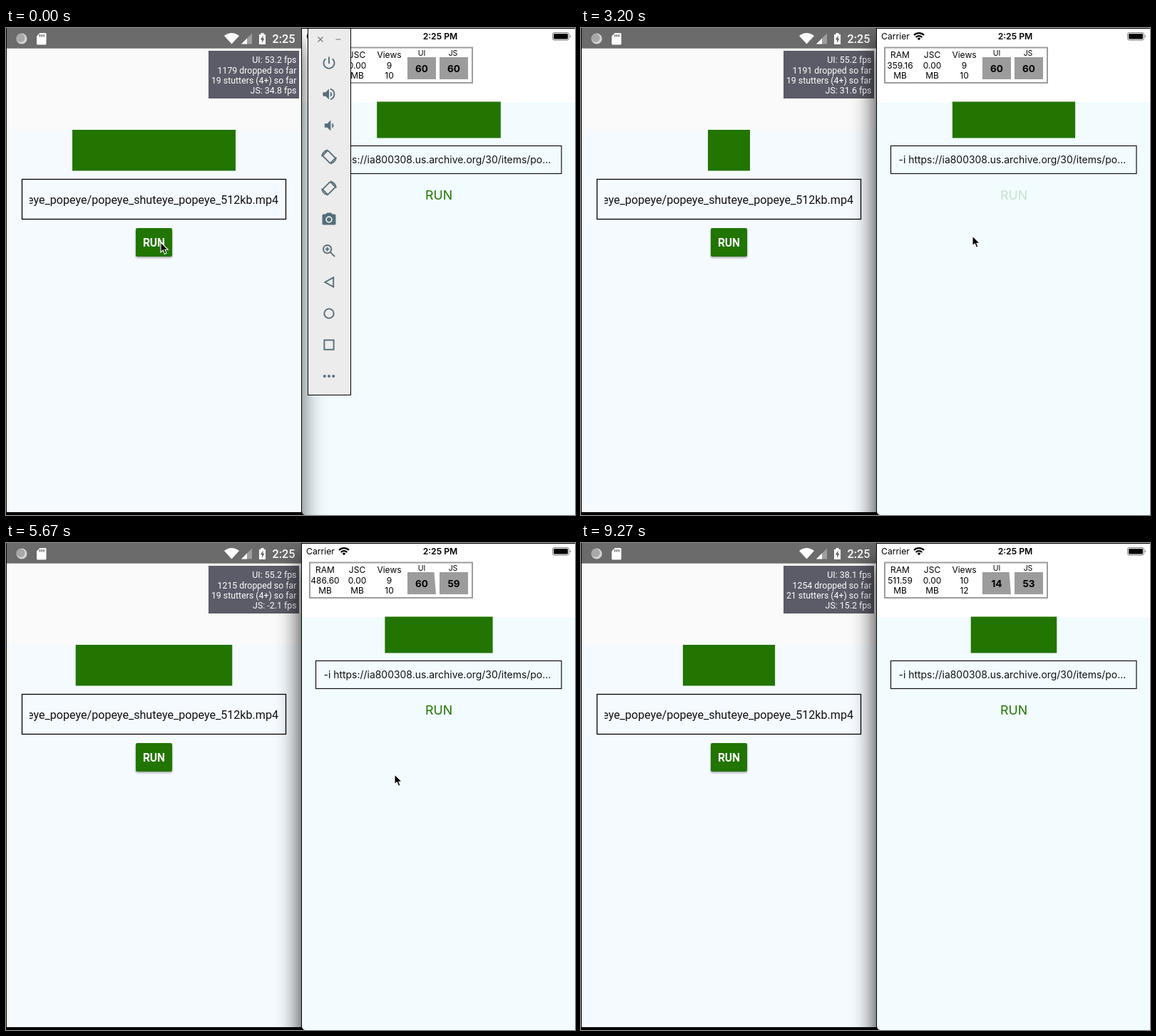
These frames come from a looping animation (798x684 px, 9.34 s). An HTML page:

```html
<!DOCTYPE html>
<html lang="en">
<head>
<meta charset="utf-8">
<title>Two phones</title>
<style>
  html, body { margin: 0; width: 100%; height: 100%; overflow: hidden; background: #000; }
  svg { display: block; width: 798px; height: 684px; }
  text { white-space: pre; }
  #android text { font-family: Roboto, sans-serif; }
  #ios text { font-family: Inter, sans-serif; }
  .mid { text-anchor: middle; }
  .end { text-anchor: end; }
  .stats { font-size: 12.35px; fill: #fff; }
  .perf { font-size: 12px; }
  .label { font-size: 10.5px; }
  .rate { font-size: 13.5px; font-weight: 700; }
  .line { fill: none; stroke: #546e7a; stroke-width: 2; }
</style>
</head>
<body>
<svg viewBox="0 0 798 684">
  <defs>
    <filter id="blur" x="-30%" y="-30%" width="160%" height="160%"><feGaussianBlur stdDeviation="17.5"/></filter>
    <filter id="lift" x="-20%" y="-20%" width="140%" height="150%"><feGaussianBlur stdDeviation="1.5"/></filter>
    <clipPath id="field"><rect x="33" y="214" width="352" height="53"/></clipPath>
  </defs>

  <g id="android">
    <rect x="-100" y="22" width="514" height="760" opacity=".68" filter="url(#blur)"/>
    <rect width="415" height="684"/>
    <rect x="1" width="413" height="28.5" fill="#6b6b6b"/>
    <rect x="1" y="28.5" width="413" height="115" fill="#fafafa"/>
    <rect x="1" y="143" width="413" height="537" fill="#f5faff"/>

    <circle cx="22" cy="15" r="7.5" fill="#d4d4d4"/>
    <circle cx="20.5" cy="14" r="6" fill="#a8a8a8"/>
    <path d="M47.5 7H55q1.5 0 1.5 1.5V22q0 1.5-1.5 1.5H44.5Q43 23.5 43 22V11.5Z" fill="#fff"/>
    <path d="M47.5 9v3.5M50.3 9v3.5M53.1 9v3.5" stroke="#6b6b6b" stroke-width="1.5"/>
    <path d="M306 11q10.5-8 21 0L316.5 22.5Z" fill="#fff"/>
    <path d="M330 22.5H345V7.5Z" fill="#fff" opacity=".35"/>
    <path d="M330 22.5H338V14.5Z" fill="#fff"/>
    <path d="M355 9h2.5V7h4v2H364V23H355Z" fill="#fff"/>
    <path d="M360.5 10.5L356.7 16.5H359V21L362.5 14.8H360.5Z" fill="#6b6b6b"/>
    <text class="end" x="405.5" y="21" font-size="16.2" font-weight="500" fill="#fff">2:25</text>

    <rect x="284" y="32" width="127" height="67" fill="#5b5c67"/>
    <g class="stats end">
      <text id="uiFps" x="407.5" y="49"/>
      <text id="dropped" x="407.5" y="63.5"/>
      <text id="stutters" x="407.5" y="78"/>
      <text id="jsFps" x="407.5" y="92"/>
    </g>

    <rect id="barA" y="143" height="57.5" fill="#217500"/>
    <rect x="22.5" y="212.5" width="370" height="56" fill="none" stroke="#000" stroke-width="1.3"/>
    <g clip-path="url(#field)">
      <text class="end" x="382" y="247" font-size="16.1" fill="#111">eye_popeye/popeye_shuteye_popeye_512kb.mp4</text>
    </g>
    <rect x="182" y="283" width="51" height="39.5" rx="2" opacity=".4" filter="url(#lift)"/>
    <rect x="182" y="281" width="51" height="40" rx="2" fill="#217500"/>
    <text class="mid" x="207.5" y="307" font-size="15.6" font-weight="700" fill="#fff">RUN</text>

    <g id="toolbar">
      <rect x="423.5" y=".5" width="60" height="515" fill="#ececec" stroke="#000"/>
      <path d="M437.5 12.5l7 7m0-7l-7 7M462.5 16h7" stroke="#777" stroke-width="1.2"/>
    </g>
  </g>

  <g id="ios">
    <rect x="415" y="22" width="500" height="760" opacity=".92" filter="url(#blur)"/>
    <path d="M414 0H798V684H420Q414 684 414 678Z"/>
    <path d="M415 1H798V684H420.5Q415 684 415 678Z" fill="#f2fcff"/>
    <path d="M415 1H798V104H415Z" fill="#fff"/>

    <text x="421" y="16" font-size="12.2">Carrier</text>
    <path d="M467 10a10 10 0 0 1 14 0M469.7 12.9a6.2 6.2 0 0 1 8.6 0" fill="none" stroke="#000" stroke-width="2.1"/>
    <path d="M474 17.2l-2.3-2.5a3.2 3.2 0 0 1 4.6 0Z"/>
    <text class="mid" x="609" y="16" font-size="12.2" font-weight="600">2:25 PM</text>
    <rect x="766.5" y="6.5" width="23" height="10.5" rx="2.5" fill="none" stroke="#777"/>
    <rect x="768" y="8" width="20" height="7.5" rx="1.3"/>
    <path d="M791 10q2 1.7 0 3.5Z" fill="#555"/>

    <rect x="426" y="27.5" width="228" height="49.5" fill="#fff" stroke="#9d9d9d" stroke-width="2"/>
    <g class="perf mid">
      <text x="447.5" y="42">RAM</text><text id="ram" x="447.5" y="56.5"/><text x="447.5" y="71">MB</text>
      <text x="492.5" y="42">JSC</text><text x="492.5" y="56.5">0.00</text><text x="492.5" y="71">MB</text>
      <text x="537.5" y="42">Views</text><text id="views" x="537.5" y="56.5"/><text id="allViews" x="537.5" y="71"/>
    </g>
    <path d="M563 41h40v31h-40ZM608 41h40v31h-40Z" fill="#9c9c9c"/>
    <path id="dip" d="M600.5 41H603V72Z" fill="#fff"/>
    <g class="mid">
      <text class="label" x="583" y="39">UI</text><text class="label" x="627" y="39">JS</text>
      <text class="rate" id="uiRate" x="583" y="61.5"/><text class="rate" id="jsRate" x="628" y="61.5"/>
    </g>

    <rect id="barI" y="103.5" height="51" fill="#217500"/>
    <rect x="434.5" y="165.5" width="344.5" height="39" fill="none" stroke="#111" stroke-width="1.2"/>
    <text x="445.5" y="190" font-size="13.95" fill="#111">-i https://ia800308.us.archive.org/30/items/po...</text>
    <text class="mid" id="run" x="607" y="241" font-size="17.8" fill="#217500">RUN</text>
  </g>

  <path id="cursor" d="M0 0V14L3.3 11 5.5 16.4 8 15.3 5.9 10.3H10.3Z" stroke="#fff" stroke-width="1.1"/>
</svg>

<script>
const LOOP = 9340, FRAME = 1000 / 15;
const el = Object.fromEntries([...document.querySelectorAll('[id]')].map(e => [e.id, e]));

// Emulator toolbar icons, 24 x 24 each, one every 44 px
const rotateIcon = '<rect class="line" x="6.5" y="4" width="11" height="16" rx="1.5" transform="rotate(-45 12 12)"/>' +
  '<path class="line" d="M1.5 11.5A10.5 10.5 0 0 1 10 2M22.5 12.5A10.5 10.5 0 0 1 14 22"/>';
const speaker = '<path d="M3 9v6h4l5 5V4L7 9Z"/><path d="M14 8q5 4 0 8Z"/>';
const dot = x => `<circle cx="${x}" cy="12" r="2.1"/>`;
const icons = [
  '<path class="line" d="M12 3v10M7 6a8 8 0 1 0 10 0"/>',
  speaker + '<path class="line" d="M14 4.3a8 8 0 0 1 0 15.4"/>',
  `<g transform="translate(2.5 0)">${speaker}</g>`,
  rotateIcon,
  `<g transform="matrix(-1 0 0 1 24 0)">${rotateIcon}</g>`,
  '<path d="M9 2L7 4H4Q2 4 2 6V18Q2 20 4 20H20Q22 20 22 18V6Q22 4 20 4H17L15 2Z"/>' +
    '<circle cx="12" cy="12" r="5" fill="#ececec"/><circle cx="12" cy="12" r="3.2"/>',
  '<circle class="line" cx="9.5" cy="9.5" r="6"/><path class="line" d="M14 14l6.5 6.5M9.5 6.5v6M6.5 9.5h6"/>',
  '<path class="line" d="M18.5 5V19L6 12Z"/>',
  '<circle class="line" cx="12" cy="12" r="7"/>',
  '<rect class="line" x="5" y="5" width="14" height="14"/>',
  dot(5.5) + dot(12) + dot(18.5)
];
el.toolbar.innerHTML += icons.map((icon, i) =>
  `<g fill="#546e7a" transform="translate(441.6 ${37.6 + 44 * i}) scale(.95)">${icon}</g>`).join('');

// When each app stalls on a run and when it recovers
const android = { stall: 4940, resume: [2090, 7470] };
const ios = { press: [2000, 6030], stall: [2036, 6187], resume: [4365, 8475] };

const clamp = v => Math.max(0, Math.min(1, v));
const ramp = (t, from, to) => clamp((t - from) / (to - from));
const smooth = u => u * u * (3 - 2 * u);

// Level from 0 to 1, easing in and out, full at `peak`, half a cycle long
function pulse(t, peak, half) {
  const u = Math.abs(t - peak) % (2 * half), d = Math.min(u, 2 * half - u) / half;
  return d < .5 ? 1 - (2 * d) ** 1.68 / 2 : (2 - 2 * d) ** 1.68 / 2;
}

function androidLevel(t) {
  const [first, second] = android.resume;
  if (t < first) return 1;
  if (t < second) return pulse(Math.min(t, android.stall), 4865, 555);
  return pulse(t > 7977 && t < 8190 ? 7977 : t, 7977, 505);
}

function iosLevel(t) {
  const { stall, resume } = ios;
  if (t < resume[0]) return pulse(Math.min(t, stall[0]), 865, 508);
  if (t < resume[1]) return pulse(Math.min(t, stall[1]), 4870, 500);
  return pulse(t, 9001, 500);
}

function setBar(bar, center, width) {
  bar.setAttribute('x', center - width / 2);
  bar.setAttribute('width', width);
}

function setText(values) {
  for (const id in values) el[id].textContent = values[id];
}

// Frames drop slowly, faster when a run starts and after the second one
function drawAndroid(t) {
  const [first, second] = android.resume;
  setBar(el.barA, 207.5, 59 + 170 * androidLevel(t));
  const ui = 53.2 + 2 * ramp(t, 0, 1000) - 7.6 * ramp(t, 6900, 8060) - 9.5 * ramp(t, 8200, 9260);
  const dropped = 1179.2 + 3.8 * t / 1000 + 4.8 * ramp(t, 3300, 4860) +
    10 * ramp(t, 4900, 5660) - 1.2 * ramp(t, 5700, 8000) + 26.5 * ramp(t, 8200, 9260);
  const js = t < first ? 34.8 - 36.8 * ramp(t, 0, 600)
    : t < second ? -2 + 33.6 * ramp(t, first, 3190) + 3.9 * ramp(t, 3200, 4860) - 37.6 * ramp(t, android.stall, 5600)
    : -2.1 + 14.5 * ramp(t, second, 8060) + 2.8 * ramp(t, 8200, 9260);
  setText({
    uiFps: `UI: ${ui.toFixed(1)} fps`,
    dropped: `${Math.floor(dropped)} dropped so far`,
    stutters: `${19 + (t > 7900) + (t > 9000)} stutters (4+) so far`,
    jsFps: `JS: ${js.toFixed(1)} fps`
  });
}

// After each run the monitor shows extra views and a low rate for a second
function drawIos(t) {
  const { press, resume } = ios;
  const runs = resume.filter(r => r <= t).length;
  const since = runs ? t - resume[runs - 1] : Infinity;
  const busy = since < 1000;
  const faded = press.reduce((sum, p, i) => sum + ramp(t, p, p + 150) - ramp(t, resume[i], resume[i] + 250), 0);
  setBar(el.barI, 607, 51 + 155 * iosLevel(t));
  el.run.setAttribute('opacity', 1 - .8 * faded);
  el.dip.setAttribute('opacity', +(t > 5000));
  setText({
    ram: ['359.16', '486.60', '511.59'][runs],
    views: busy ? 10 : 9,
    allViews: busy ? 12 : 10,
    uiRate: busy ? (since < 600 ? 3 : 14) : 60,
    jsRate: since > 600 && since < 1600 ? [60, 59, 53][runs] : 60
  });
}

// Cursor moves: start time and destination
const moves = [[250, 585, 302], [1400, 604, 230], [2250, 549, 292], [3350, 207, 297],
  [4995, 545, 325], [5680, 604, 225], [6420, 791, 238], [6900, 802, 240]];

function drawCursor(t) {
  let x = 217, y = 301;
  for (const [start, toX, toY] of moves) {
    const k = smooth(ramp(t, start, start + 400));
    x += (toX - x) * k;
    y += (toY - y) * k;
  }
  el.cursor.setAttribute('transform', `translate(${x} ${y})`);
}

let front;
function raise(name) {
  if (front === name) return;
  front = name;
  el.cursor.before(el[name]);
}

function draw(t) {
  raise(t < 800 || t >= 3860 && t < 5460 ? 'android' : 'ios');
  drawAndroid(t);
  drawIos(t);
  drawCursor(t);
}

const start = performance.now();
function tick() {
  const t = (performance.now() - start) % LOOP;
  draw(Math.floor((t + 4) / 66.7) * FRAME);
  requestAnimationFrame(tick);
}
tick();
</script>
</body>
</html>
```
